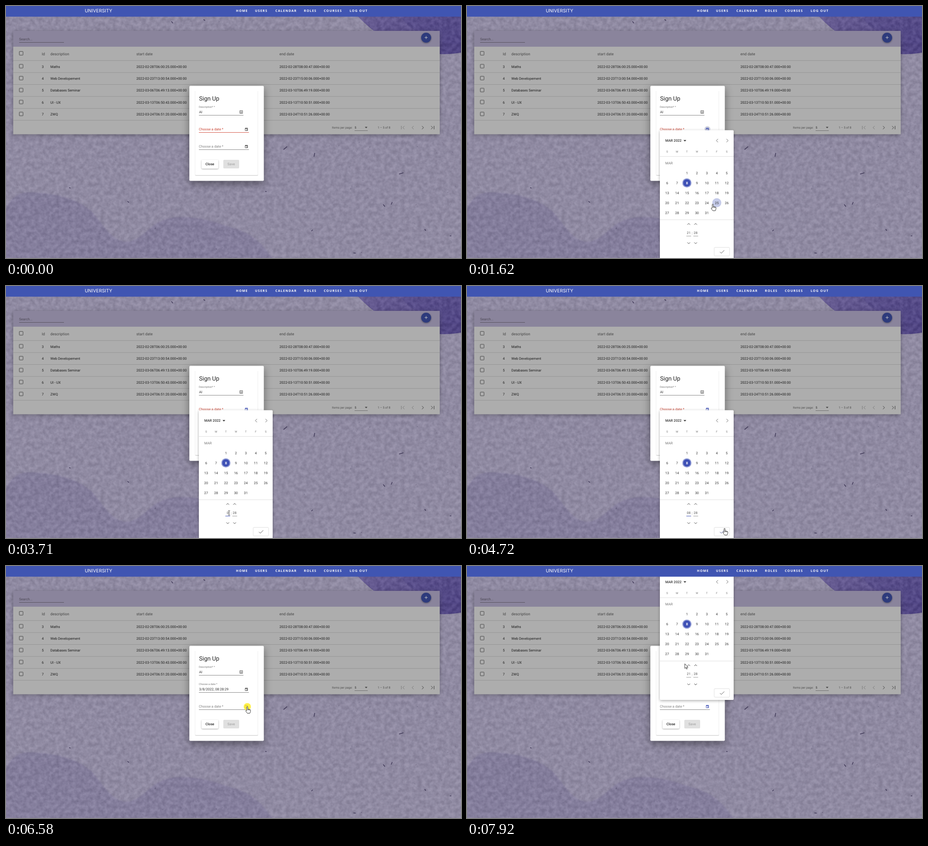
An HTML page that plays this animation: 1005x557 px, repeating every 8 s.

```html
<!DOCTYPE html>
<html lang="en">
<head>
<meta charset="utf-8">
<title>Course admin</title>
<style>
  html, body { margin: 0; width: 100%; height: 100%; overflow: hidden; background: #918ba4; }
  svg { display: block; width: 100vw; height: 100vh; font-family: Roboto, sans-serif; text-rendering: geometricPrecision; }
  .line { fill: none; stroke-width: 1; }
  #modal { filter: drop-shadow(0 6px 9px rgba(0, 0, 0, .42)); }
  #popup > rect:first-child { filter: drop-shadow(0 2px 3px rgba(0, 0, 0, .32)); }
</style>
</head>
<body>
<svg id="stage" viewBox="0 0 1005 557">
  <defs>
    <filter id="grain" x="0" y="0" width="1" height="1" color-interpolation-filters="sRGB">
      <feTurbulence type="fractalNoise" baseFrequency=".11" numOctaves="4" seed="5"/>
      <feColorMatrix values="1.8 0 0 0 -.4  1.8 0 0 0 -.4  1.8 0 0 0 -.35  0 0 0 0 .09"/>
    </filter>
    <filter id="soft"><feGaussianBlur stdDeviation="1.5"/></filter>
    <filter id="shade" x="-5%" y="-10%" width="110%" height="125%"><feGaussianBlur stdDeviation="4"/></filter>
    <linearGradient id="violet" x1="0" y1="0" x2="1" y2="1">
      <stop offset="0" stop-color="#675b94"/><stop offset="1" stop-color="#493d80"/>
    </linearGradient>
    <linearGradient id="hill" x1="0" y1="0" x2="0" y2="1">
      <stop offset="0" stop-color="#827b9b"/><stop offset="1" stop-color="#857e9e"/>
    </linearGradient>
    <g id="calendarIcon">
      <path d="M-2.7-2.4H2.7V3H-2.7Z" fill="none" stroke="currentColor" stroke-width=".9"/>
      <path d="M-2.7-2.6H2.7V-1H-2.7ZM-2-3.6h1v1.3h-1ZM1-3.6h1v1.3H1ZM.2.3h1.7V2H.2Z" fill="currentColor"/>
    </g>
  </defs>

  <g id="wallpaper">
    <rect width="1005" height="557" fill="#918ba4"/>
    <path d="M776 22C800 46 832 76 880 92S970 109 1005 103V22Z" fill="url(#violet)"/>
    <path d="M870 22C900 62 950 84 1005 84V22Z" fill="#4d4186" opacity=".45"/>
    <path d="M0 447C14 421 30 411 56 412C104 414 152 423 184 450C213 475 228 519 265 521C304 520 312 480 362 469C400 461 452 473 489 487C536 498 562 519 588 557H0Z" fill="url(#hill)" filter="url(#soft)"/>
    <rect width="1005" height="557" filter="url(#grain)"/>
    <g id="specks"></g>
  </g>

  <g id="table">
    <rect x="16" y="57" width="942" height="229" fill="#000" opacity=".3" filter="url(#shade)"/>
    <rect x="16" y="55" width="942" height="36" fill="#8a849c"/>
    <rect x="16" y="90" width="942" height="193.5" fill="#adadad"/>
    <circle cx="928" cy="71" r="11.5" fill="#000" opacity=".3" filter="url(#soft)"/>
    <circle cx="928" cy="70" r="11" fill="#2d3a7c"/>
    <path class="line" d="M924.7 69.7h6.6M928 66.4v6.6" stroke="#c4c4c8"/>
    <path class="line" d="M29 80.5h99" stroke="#58545f"/>
    <path class="line" d="M770 275.5h29" stroke="#707070" stroke-width=".8"/>
    <path d="M792.5 267h6l-3 3.2Z" fill="#4a4a4a"/>
    <path class="line" d="M873.2 265v7.5M880 265.3l-3.5 3.5l3.5 3.5M900.3 265.3l-3.5 3.5l3.5 3.5" stroke="#777" stroke-width="1.1"/>
    <path class="line" d="M918.8 265.3l3.5 3.5l-3.5 3.5M939 265.3l3.5 3.5l-3.5 3.5M945.5 265v7.5" stroke="#3b3b3b" stroke-width="1.2"/>
  </g>

  <g id="modal">
    <rect x="405" y="176.5" width="164.5" height="210" rx="2.2" fill="#fff"/>
  </g>
  <g id="form">
    <path class="line" d="M417.7 188V372M556.3 188V372" stroke="#eee"/>
    <path class="line" d="M418 373q0 1.4 1.6 1.4h135.2q1.6 0 1.6-1.4" stroke="#c2c2c2"/>
    <path class="line" d="M426 241.5h98.5M426 317.5h110.5" stroke="#8a8a8a" stroke-width=".9"/>
    <path class="line" id="firstLine" d="M426 279.5h110.5" stroke-width=".9"/>
    <path class="line" d="M516.5 231.3h6v6h-6ZM518.2 235.8h2.7" stroke="#555" stroke-width=".9"/>
    <circle cx="519.5" cy="233.7" r="1" fill="#555"/>
    <circle id="focusRing" cx="531" cy="272" r="6.5" fill="#d0d2de"/>
    <use id="firstIcon" href="#calendarIcon" x="531" y="272.5"/>
    <use id="secondIcon" href="#calendarIcon" x="531" y="310.5"/>
    <rect x="432" y="341" width="37" height="19.5" rx="2" fill="#000" opacity=".35" filter="url(#soft)"/>
    <rect x="432" y="340" width="37" height="19.5" rx="2" fill="#fff"/>
    <rect x="480" y="340" width="35" height="19" rx="2" fill="#e0e0e0"/>
  </g>

  <g id="popup">
    <rect x="426" y="274.5" width="163" height="284" rx="2" fill="#fff"/>
    <path d="M478.3 296.2h6l-3 3.2Z" fill="#333"/>
    <path class="line" d="M554.4 293.8l-3.6 3.7l3.6 3.7M573.2 293.8l3.6 3.7l-3.6 3.7" stroke="#666" stroke-width="1.1"/>
    <path class="line" d="M426 332.5h163M426 472.5h163" stroke="#e0e0e0" stroke-width=".9"/>
    <circle id="dayHover" r="10" fill="#c5cbe9"/>
    <circle cx="485.7" cy="391" r="10" fill="#3f51b5"/>
    <circle cx="485.7" cy="391" r="8.9" fill="none" stroke="#fff" stroke-width=".8"/>
    <path class="line" d="M486.8 483.5l3-3l3 3M502 483.5l3-3l3 3M486.8 522.5l3 3l3-3M502 522.5l3 3l3-3" stroke="#444" stroke-width="1.1"/>
    <path class="line" d="M500 508.5h10.5" stroke="#999" stroke-width=".8"/>
    <path class="line" id="hourLine" d="M484.5 508.5h10.5"/>
    <rect id="selection" x="485" y="497" width="9.5" height="8.5" fill="#3390ff"/>
    <rect x="546" y="533.5" width="34" height="19" rx="2" fill="#fff" stroke="#dcdcdc" stroke-width=".9"/>
    <path class="line" id="check" d="M558.7 543.5l3 3l6.6-6.6" stroke-width="1.1"/>
  </g>

  <g id="nav"><rect width="1005" height="23.6" fill="#4055b2"/></g>

  <circle id="clickDot" r="8" fill="#ffee2e"/>
  <g id="cursor" stroke-linejoin="round">
    <path id="arrow" d="M0 0V10.4L2.4 8.3L4 11.9L5.6 11.2L4 7.7H7.3Z" fill="#fff" stroke="#222" stroke-width=".9"/>
    <g id="hand">
      <path d="M-1.3 8.8V1a1.2 1.2 0 0 1 2.4 0V5.6q1.2-.8 2 .2q1.3-.5 2 .4q1.9-.2 1.9 1.4V10.5L5.6 14.5H0L-3.4 9.8q-.4-1.8 1-1.4Z" fill="#fff" stroke="#222" stroke-width=".9"/>
      <path class="line" d="M1.1 5.6V7.6M3.1 6V7.8M5.1 6.4V8" stroke="#222" stroke-width=".7"/>
    </g>
    <path id="beam" class="line" d="M-2-5.2q1.6 0 2 1q.4-1 2-1M0-4.2V4.2M-2 5.2q1.6 0 2-1q.4 1 2 1" stroke="#333"/>
  </g>
</svg>

<script>
const NS = 'http://www.w3.org/2000/svg';
const el = id => document.getElementById(id);
const attrs = (node, values) => {
  for (const key in values) node.setAttribute(key, values[key]);
  return node;
};
const add = (parent, tag, values) => el(parent).appendChild(attrs(document.createElementNS(NS, tag), values));
const show = (id, on) => { el(id).style.display = on ? '' : 'none'; };

const BODY = 7.66, SMALL = 5.75;

// y is the middle of the capital letters
function text(parent, x, y, content, size, fill, more = {}) {
  const node = add(parent, 'text', { x, y: y + size * .36, 'font-size': size, fill, ...more });
  node.textContent = content;
  return node;
}
const middle = { 'text-anchor': 'middle' };
const medium = { 'font-weight': 500 };

// Wallpaper flecks
let seed = 17;
const random = () => (seed = seed * 16807 % 2147483647) / 2147483647;
function fleck(x, y, length, angle, width, opacity) {
  const dx = Math.cos(angle) * length / 2, dy = Math.sin(angle) * length / 2;
  add('specks', 'path', { d: `M${x - dx} ${y - dy}L${x + dx} ${y + dy}`, stroke: '#2c2545',
    'stroke-width': width, 'stroke-linecap': 'round', opacity });
}
for (let i = 0; i < 190; i++) {
  fleck(random() * 1005, 24 + random() * 533, .4 + random() * 2, random() * 3.14, .5 + random() * .6, .12 + random() * .4);
}
[[617, 314, 9, -.7], [681, 329, 7, -1.4], [873, 370, 9, -.3], [852, 436, 5, -1.2], [835, 441, 5, .9],
 [270, 433, 3, .6], [574, 410, 2, 0], [676, 496, 3, -.8], [982, 508, 2, 0], [770, 546, 4, .1],
 [367, 36, 4, .9], [141, 402, 2, .5], [438, 31, 3, .6], [926, 495, 3, 1]]
  .forEach(([x, y, length, angle]) => fleck(x, y, length, angle, 1.5, .8));

// Navigation
text('nav', 174, 10, 'UNIVERSITY', 10.2, '#fff', { 'font-family': 'Inter, sans-serif' });
[[508, 'HOME'], [550, 'USERS'], [595, 'CALENDAR'], [658, 'ROLES'], [702, 'COURSES'], [759, 'LOG OUT']]
  .forEach(([x, label]) => text('nav', x, 10, label, 7.1, '#fff',
    { 'font-family': 'Open Sans, sans-serif', 'font-weight': 700, 'letter-spacing': 1.2 }));

// Table
text('table', 29, 73, 'Search...', BODY, '#4d4956');
[[79, 'Id'], [98, 'description'], [288, 'start date'], [604, 'end date']]
  .forEach(([x, label]) => text('table', x, 105.5, label, 8.4, '#444'));
const checkbox = y => add('table', 'rect',
  { x: 29.4, y: y - 4.1, width: 8.2, height: 8.2, rx: .8, fill: 'none', stroke: '#484848' });
const rule = y => add('table', 'path', { class: 'line', d: `M16 ${y}h942`, stroke: '#949494', 'stroke-width': .8 });
checkbox(104.5);
rule(120.7);
[[3, 'Maths', '02-28T06:00:25', '02-28T08:00:47'],
 [4, 'Web Developement', '02-23T13:00:54', '02-23T15:00:06'],
 [5, 'Databases Seminar', '03-06T06:49:13', '03-10T06:49:19'],
 [6, 'UI - UX', '03-13T06:50:43', '03-13T10:50:51'],
 [7, 'ZWQ', '03-24T06:51:20', '03-24T10:51:26']].forEach(([id, name, start, end], i) => {
  const y = 133.8 + i * 26.4, stamp = day => `2022-${day}.000+00:00`;
  checkbox(y - .8);
  rule(y + 13.3);
  [[79, id], [98, name], [288, stamp(start)], [604, stamp(end)]]
    .forEach(([x, label]) => text('table', x, y, label, BODY, '#1c1c1c'));
});
text('table', 720, 268.5, 'Items per page:', 6.57, '#4f4f4f');
text('table', 770, 268.5, '5', 6.57, '#222');
text('table', 821, 268.3, '1 – 5 of 8', 6.57, '#4f4f4f');

// Form
text('form', 426.5, 204, 'Sign Up', 13.1, '#222');
text('form', 426, 223, 'Description* *', SMALL, '#777');
text('form', 426.5, 234.3, 'AI', BODY, '#333');
const firstLabel = text('form', 426, 272, 'Choose a date *', BODY, '#c8402f');
const floatLabel = text('form', 426, 261, 'Choose a date *', SMALL, '#777');
const firstValue = text('form', 426.5, 272, '3/8/2022, 08:28:29', BODY, '#333');
text('form', 426, 310.2, 'Choose a date *', BODY, '#808080');
text('form', 450.3, 349.5, 'Close', BODY, '#222', { ...middle, ...medium });
text('form', 497.3, 349.5, 'Save', BODY, '#aaa', { ...middle, ...medium });

// Calendar popup
const dayX = column => 442 + column * 21.95, dayY = row => 369 + row * 21.95;
text('popup', 438, 297.5, 'MAR 2022', BODY, '#333', medium);
[...'SMTWTFS'].forEach((letter, i) => text('popup', dayX(i), 322, letter, 6, '#777', middle));
text('popup', 438, 347, 'MAR', BODY, '#777');
for (let day = 1; day <= 31; day++) {
  const slot = day + 1, chosen = day === 8;
  text('popup', dayX(slot % 7), dayY(Math.floor(slot / 7)), day, 7.5, chosen ? '#fff' : '#333',
    { ...middle, 'font-weight': chosen ? 700 : 400 });
}
const hour = text('popup', 489.7, 501, '21', 7.4, '#555', middle);
text('popup', 497.2, 502.5, ':', 7.4, '#444', middle);
text('popup', 505, 501, '28', 7.4, '#555', middle);

// Time, x, y, pointer shape
const path = [
  [70, 764, 441, 'arrow'], [300, 640, 352, 'arrow'], [540, 512, 274, 'arrow'], [640, 526, 274, 'hand'],
  [840, 533, 273, 'hand'], [1619, 533, 273, 'hand'], [1620, 543, 438, 'hand'], [1860, 526, 456, 'hand'],
  [2000, 512, 474, 'arrow'], [2250, 497, 496, 'beam'], [2400, 493, 501, 'beam'], [2480, 492.7, 501.5, 'beam'],
  [4410, 492.7, 501.5, 'arrow'], [4640, 562, 534, 'hand'], [4720, 569, 536, 'hand'], [4960, 570, 540, 'hand'],
  [5120, 570, 540, 'hand'], [5200, 574, 543, 'arrow'], [5270, 574, 543.5, 'arrow'], [5890, 541, 318, 'arrow'],
  [5970, 539, 316, 'hand'], [6400, 533, 311, 'hand'], [7670, 533, 311, 'arrow'], [7840, 484, 209, 'arrow'],
  [7920, 481, 216, 'arrow'], [8001, 481, 216, 'arrow']
];
const clicks = [[910, 1160], [2690, 3020], [4890, 5120], [6490, 6820]];

const clamp = v => Math.min(1, Math.max(0, v));
const between = (t, start, end) => t >= start && t < end;

function pointerAt(t) {
  const i = path.findIndex(key => key[0] > t) - 1;
  if (i < 0) return null;
  const [t0, x0, y0, shape] = path[i], [t1, x1, y1] = path[i + 1];
  const k = (t - t0) / (t1 - t0);
  return { x: x0 + (x1 - x0) * k, y: y0 + (y1 - y0) * k, shape };
}

function drawPointer(t, pointer) {
  show('cursor', pointer);
  const click = clicks.find(([start, end]) => between(t, start, end));
  show('clickDot', click);
  if (!pointer) return;
  const move = `translate(${pointer.x} ${pointer.y})`;
  attrs(el('cursor'), { transform: move });
  for (const shape of ['arrow', 'hand', 'beam']) show(shape, pointer.shape === shape);
  if (click) {
    const k = (t - click[0]) / (click[1] - click[0]);
    attrs(el('clickDot'), { transform: move, opacity: .85 * clamp(2 - 2 * k) });
  }
}

function drawPopup(t, pointer) {
  const second = t >= 6000;
  const opening = clamp((t - (second ? 6590 : 1000)) / 120);
  const closing = second ? 0 : clamp((t - 5130) / 100);
  const eased = 1 - (1 - opening) ** 3;
  const scale = .8 + .2 * eased, top = second ? 12 : 274.5;
  show('popup', eased > 0 && closing < 1);
  attrs(el('popup'), { opacity: eased * (1 - closing), transform: `translate(0 ${top - 274.5 * scale}) scale(1 ${scale})` });

  const typing = between(t, 2700, 6000);
  const selected = between(t, 2860, 3710);
  hour.textContent = !between(t, 3710, 6000) ? '21' : t < 3870 ? '0' : '08';
  attrs(hour, { fill: selected ? '#fff' : '#555' });
  show('selection', selected);
  attrs(el('hourLine'), { stroke: typing && t > 2780 ? '#3f51b5' : '#999', 'stroke-width': typing && t > 2780 ? 1.4 : .8 });
  attrs(el('check'), { stroke: between(t, 4600, 5200) ? '#3f4a86' : '#555' });

  let hovered = false;
  if (pointer && between(t, 1620, 5120)) {
    const column = Math.round((pointer.x - 442) / 21.95), row = Math.round((pointer.y - 369) / 21.95);
    const cx = dayX(column), cy = dayY(row);
    hovered = row <= 4 && row * 7 + column <= 32 && Math.hypot(pointer.x - cx, pointer.y - cy) < 10.5;
    if (hovered) attrs(el('dayHover'), { cx, cy });
  }
  show('dayHover', hovered);
}

function drawForm(t) {
  const filled = t >= 5150;
  firstLabel.style.display = filled ? 'none' : '';
  floatLabel.style.display = firstValue.style.display = filled ? '' : 'none';
  attrs(el('firstLine'), { stroke: filled ? '#8a8a8a' : '#d4584a' });
  show('focusRing', between(t, 920, 2780));
  attrs(el('firstIcon'), { color: between(t, 1000, 5150) ? '#3f51b5' : '#4a4a4a' });
  attrs(el('secondIcon'), { color: t >= 6590 ? '#3f51b5' : '#4a4a4a' });
}

function frame(now) {
  const t = now % 8000, pointer = pointerAt(t);
  drawForm(t);
  drawPopup(t, pointer);
  drawPointer(t, pointer);
  requestAnimationFrame(frame);
}
frame(0);
</script>
</body>
</html>
```
